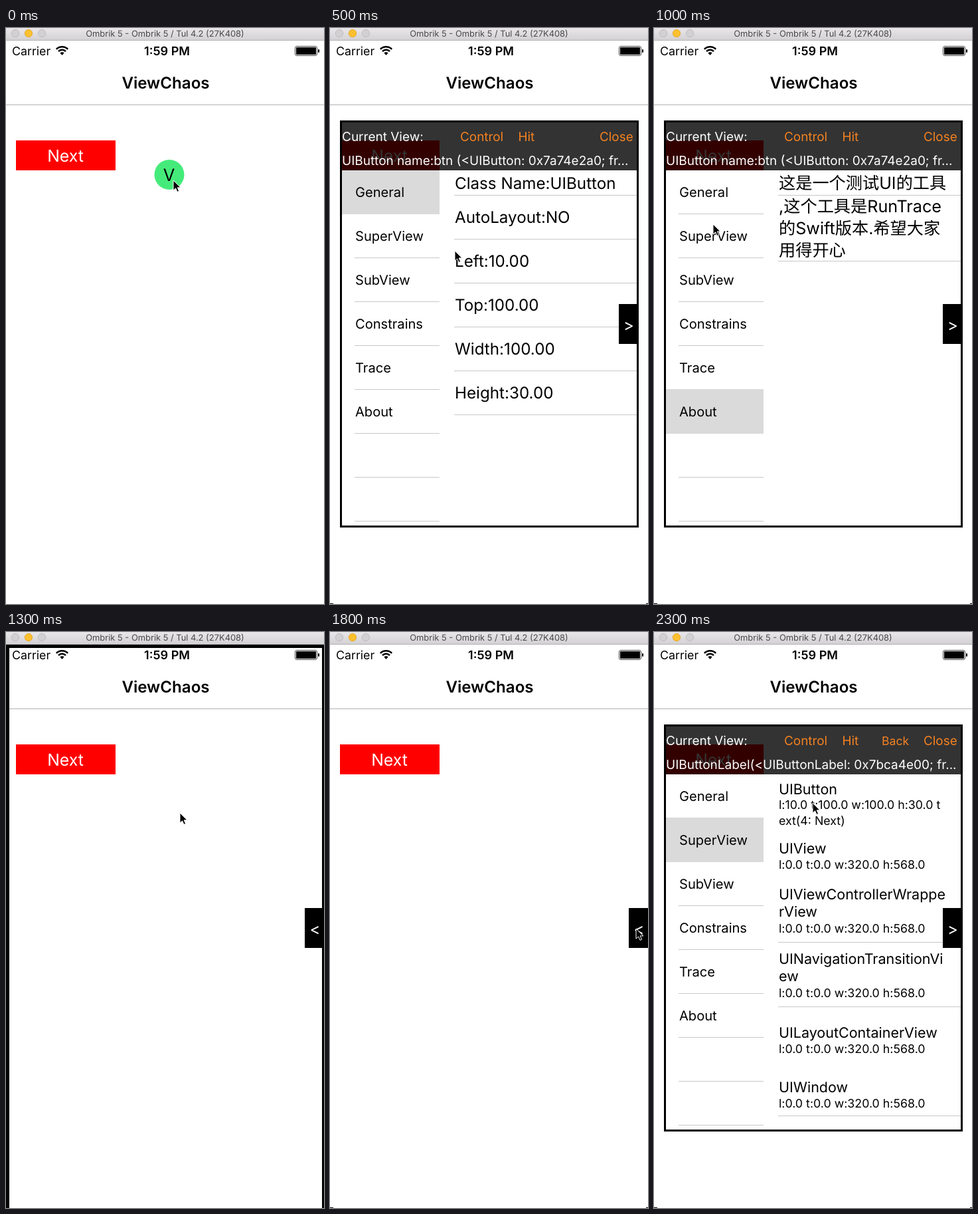
An HTML page for the animation above (2.4 s loop, 479x866 px).

```html
<!DOCTYPE html>
<html lang="en">
<head>
<meta charset="utf-8">
<title>View inspector</title>
<style>
  html, body { margin: 0; width: 100%; height: 100%; overflow: hidden; background: #fff; }
  svg { display: block; width: 479px; height: 866px; }
  text {
    font-family: Inter, "Noto Sans CJK SC", "Noto Sans CJK", "Noto Sans", sans-serif;
    white-space: pre; text-rendering: geometricPrecision;
  }
</style>
</head>
<body>
<svg id="stage" viewBox="0 0 479 866" xmlns="http://www.w3.org/2000/svg">
  <defs>
    <linearGradient id="bar" x2="0" y2="1">
      <stop offset="0" stop-color="#e9e7e9"/><stop offset="1" stop-color="#d3d1d3"/>
    </linearGradient>
  </defs>
  <g id="base"></g>
  <g id="scene"></g>
</svg>
<script>
const STEP = 100, LOOP = 2400;
const ORANGE = '#f58220', LINE = '#c8c7cc';

const esc = s => s.replace(/&/g, '&amp;').replace(/</g, '&lt;');
const rect = (x, y, w, h, fill, more = '') =>
  `<rect x="${x}" y="${y}" width="${w}" height="${h}" fill="${fill}" ${more}/>`;
const text = (s, x, y, size, fill = '#000', more = '') =>
  `<text x="${x}" y="${y}" font-size="${size}" fill="${fill}" ${more}>${esc(s)}</text>`;
const centred = (s, x, y, size, fill, weight = 400) =>
  text(s, x, y, size, fill, `text-anchor="middle" font-weight="${weight}"`);
const rule = (x, y, right) => rect(x, y, right - x, 1, LINE);

function windowChrome() {
  const dots = [[14, '#d2d0d2', '#b9b7b9'], [34, '#fdc02f', '#dfa023'], [54, '#d2d0d2', '#b9b7b9']]
    .map(([x, fill, edge]) => `<circle cx="${x}" cy="8" r="5.7" fill="${fill}" stroke="${edge}" stroke-width=".8"/>`);
  return rect(0, 0, 479, 18, 'url(#bar)') + rect(0, 18, 479, 1, '#b4b2b4') + dots.join('') +
    centred('Ombrik 5 - Ombrik 5 / Tul 4.2 (27K408)', 239.5, 13, 12.9, '#4a4a4a');
}

function wifi() {
  const arc = r => {
    const d = r * 0.72;
    return `<path d="M${84.5 - d} ${40.5 - d}A${r} ${r} 0 0 1 ${84.5 + d} ${40.5 - d}" fill="none" stroke="#000" stroke-width="2.6"/>`;
  };
  return arc(12) + arc(7.6) + '<path d="M84.5 41L81.4 37.6A4.4 4.4 0 0 1 87.6 37.6Z"/>';
}

function phone() {
  return rect(0, 19, 479, 847, '#fff') + text('Carrier', 9, 41, 17.8) + wifi() +
    centred('1:59 PM', 242.5, 41, 18.1, '#000', 600) +
    rect(435.5, 27.5, 33, 14, '#fff', 'rx="2.5" stroke="#444"') + rect(437, 29, 30, 11, '#000', 'rx="1"') +
    rect(470, 32, 2, 5, '#000', 'rx="1"') +
    centred('ViewChaos', 240.5, 91, 24.1, '#000', 600) + rect(0, 115, 479, 1, '#b2b2b2') +
    rect(15, 169, 150, 45, '#f00') + centred('Next', 89.5, 200.6, 24.8, '#fff');
}

const cursor = (x, y) =>
  `<path transform="translate(${x} ${y})" d="M0 0V15.2L3.6 11.9L6 17.4L8.6 16.3L6.2 10.9H11Z" fill="#000" stroke="#fff" stroke-width="1"/>`;

const ball = (x, y) =>
  `<circle cx="${x}" cy="${y}" r="22.5" fill="#45eb7a"/>` + centred('V', x - .5, y + 9.5, 25.5, '#000');

const corners = rect(0, 865, 5, 1, '#000') + rect(476, 865, 3, 1, '#000');

const flashes = {
  root: rect(0, 19, 479, 5, '#000') + rect(0, 19, 5, 847, '#000') + rect(476, 19, 3, 847, '#000'),
  button: rect(17, 171, 146, 41, 'none', 'stroke="#000" stroke-width="4"'),
  label: rect(63, 178, 54, 29, 'rgba(0,0,0,.16)', 'stroke="rgba(0,0,0,.28)" stroke-width="2"')
};

const title = (s, y, size = 21.5) => text(s, 188, y, size);
const note = (s, y) => text(s, 188, y, 17.8);
const FRAME = 'l:0.0 t:0.0 w:320.0 h:568.0';
const buttonNote = y => note('l:10.0 t:100.0 w:100.0 h:30.0 t', y) + note('ext(4: Next)', y + 24);

function general(name, values) {
  const rows = ['Class Name:' + name, 'AutoLayout:NO',
    ...['Left', 'Top', 'Width', 'Height'].map((key, i) => `${key}:${values[i]}.00`)];
  return rows.map((row, i) =>
    title(row, i ? 227 + 66 * i : 242, 24.2) + rule(187, 251 + 66 * i, 462)).join('');
}

// Ancestors of the button, listed from its parent up to the window.
const ancestors = dy => `<g transform="translate(0 ${dy})">` +
  title('UIView', 333) + note(FRAME, 356) +
  title('UIViewControllerWrappe', 402) + title('rView', 428) + note(FRAME, 452) + rule(187, 466, 462) +
  title('UINavigationTransitionVi', 499) + title('ew', 525) + note(FRAME, 549) + rule(187, 563, 462) +
  title('UILayoutContainerView', 610) + note(FRAME, 633) +
  title('UIWindow', 692) + note(FRAME, 715) + rule(187, 727, 462) + '</g>';

const lists = {
  button: () => general('UIButton', [10, 100, 100, 30]),
  label: () => general('UIButtonLabel', [31, 4, 37, 21]),
  buttonUp: () => ancestors(-90),
  labelUp: () => title('UIButton', 244) + buttonNote(266) + ancestors(0),
  viewDown: () => title('UIButton', 244, 24.1) + buttonNote(268),
  buttonDown: () => title('UIButtonLabel', 244, 24.1) + note('l:31.0 t:4.0 w:37.0 h:21.0', 268),
  empty: () => '',
  about: () => ['这是一个测试UI的工具', ',这个工具是RunTrace', '的Swift版本.希望大家', '用得开心']
    .map((s, i) => title(s, i ? 244 + 33 * i : 242, 25.2)).join('') + rule(187, 251, 462) + rule(187, 350, 462)
};

const heads = {
  button: 'UIButton name:btn (<UIButton: 0x7a74e2a0; fr...',
  view: 'UIView(<UIView: 0x7a73e580; frame = (0 0; 32...',
  label: 'UIButtonLabel(<UIButtonLabel: 0x7bca4e00; fr...'
};

const menu = ['General', 'SuperView', 'SubView', 'Constrains', 'Trace', 'About', '', ''];

function panel(head, selected, list, back) {
  const rows = menu.map((s, i) => rule(37, 279 + 66 * i, 165)).join('') +
    rect(18, selected ? 213 + 66 * selected : 214, 147, selected ? 67 : 66, '#dadada') +
    menu.map((s, i) => text(s, 38, 254.3 + 66 * i, 20.1)).join('');
  return rect(16.5, 214, 447, 535, '#fff') + rows + lists[list]() +
    rect(18, 142, 444, 72, 'rgba(0,0,0,.8)') +
    text('Current View:', 18, 170, 19, '#fff') + text('Control', 196, 170, 18.9, ORANGE) +
    text('Hit', 283.5, 170, 18.9, ORANGE) + (back ? text('Back', 343, 170, 17.6, ORANGE) : '') +
    text('Close', 406, 170, 18.9, ORANGE) + text(heads[head], 18, 206, 19, '#fff') +
    rect(16.5, 140.5, 447, 609, 'none', 'stroke="#000" stroke-width="3"') +
    rect(435, 415, 28, 60, '#000') + centred('>', 450, 454.6, 24, '#fff');
}

const tab = rect(450, 415, 29, 60, '#000') + centred('<', 465.5, 454.6, 24, '#fff');

const drag = flash => (x, y) => (flash ? flashes[flash] : '') + ball(x - 6, y - 8.5);
const open = (...args) => () => corners + panel(...args);
const shut = flash => () => corners + tab + (flash ? flashes[flash] : '');

// Each step: pointer x, pointer y, view.
const steps = [
  [252, 229, drag()],
  [215, 222, drag('root')],
  [130, 205, drag('button')],
  [112, 201, open('button', 0, 'button')],
  [150, 260, open('button', 0, 'button')],
  [188, 335, open('button', 0, 'button')],
  [145, 328, open('button', 0, 'button')],
  [100, 318, open('button', 1, 'buttonUp')],
  [100, 430, open('button', 3, 'empty')],
  [85, 560, open('button', 5, 'about')],
  [89, 295, open('button', 5, 'about')],
  [100, 306, open('button', 1, 'buttonUp')],
  [215, 245, open('button', 1, 'buttonUp')],
  [262, 272, shut('root')],
  [460, 440, shut()],
  [136, 365, open('view', 2, 'viewDown', true)],
  [220, 250, open('view', 2, 'viewDown', true)],
  [300, 262, shut('button')],
  [461, 446, shut()],
  [220, 250, open('button', 2, 'buttonDown', true)],
  [224, 310, shut('label')],
  [460, 442, shut()],
  [150, 300, open('label', 0, 'label', true)],
  [239, 257, open('label', 1, 'labelUp', true)]
];

const scene = document.getElementById('scene');
document.getElementById('base').innerHTML = phone() + windowChrome();

let shown = -1;
function draw(now) {
  const i = Math.floor((now % LOOP) / STEP);
  if (i !== shown) {
    const [x, y, view] = steps[i];
    scene.innerHTML = view(x, y) + cursor(x, y);
    shown = i;
  }
}

const start = performance.now();
function tick() {
  draw(performance.now() - start);
  requestAnimationFrame(tick);
}
tick();
</script>
</body>
</html>
```
